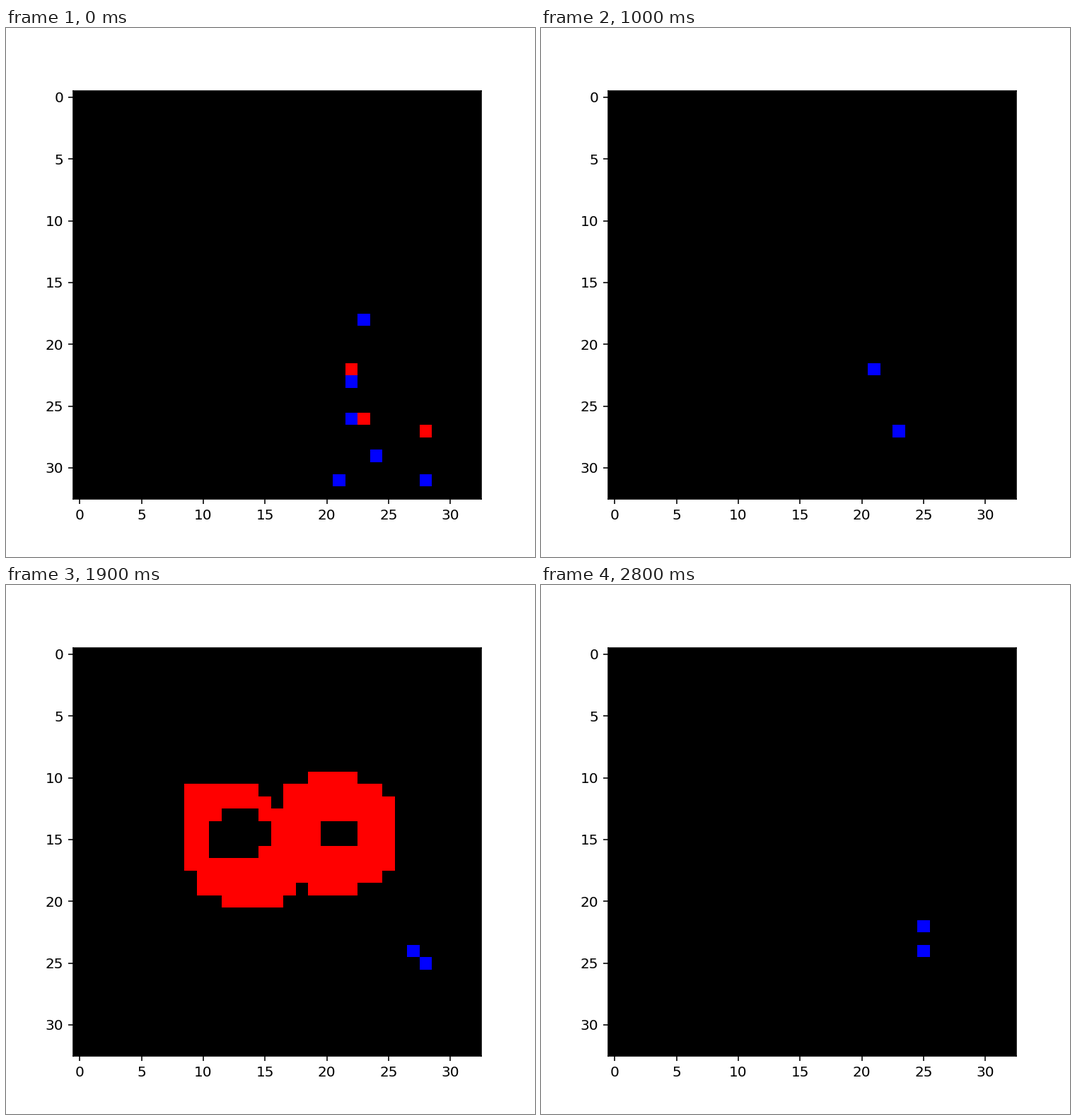
A matplotlib script that plays this animation: 748x748 px, repeating every 2.9 s.

```python
import numpy as np
import matplotlib.pyplot as plt
from matplotlib.animation import FuncAnimation

SIZE, DPI = 748, 144
GRID = 33
FRAMES, INTERVAL = 29, 100
RED, BLUE = 0, 2
LEFT, BOTTOM, SIDE = 95.47, 82.37, 576.58  # axes in pixels

ROW, COL = np.mgrid[:GRID, :GRID]


def oval(x, y, rx, ry, power=2, slant=0):
    """Field that is below 1 inside a slanted superellipse."""
    dx, dy = COL - x - slant * (ROW - y), ROW - y
    return np.abs(dx / rx) ** power + np.abs(dy / ry) ** power


def digit():
    """Mask of an eight lying on its side, with slightly rough edges."""
    rough = np.random.default_rng(8).normal(1, 0.06, (GRID, GRID))
    left = oval(12.7, 15.6, 4.1, 5, power=3, slant=0.25)
    right = oval(20.8, 14.5, 5, 4.8, power=2.3)
    holes = np.minimum(oval(12.8, 14.8, 2.6, 2.2), oval(21, 14.4, 1.6, 1.4))
    return (np.minimum(left, right) < rough) & (holes > 1)


DIGIT = digit()


def flash(i, start, peak, rate):
    """Share of the digit that fires: a sudden onset, then a decay."""
    return min(1, peak * np.exp(-rate * (i - start))) if i >= start else 0


def fire(share, rng):
    """Pick a share of the digit's pixels in small clumps."""
    noise = rng.random((GRID, GRID))
    clumps = noise + 0.3 * sum(np.roll(noise, step, axis)
                               for step in (-1, 1) for axis in (0, 1))
    return DIGIT & (clumps <= np.quantile(clumps[DIGIT], share))


def picture(i):
    rng = np.random.default_rng(i)
    image = np.zeros((GRID, GRID, 3))

    # Stray events, mostly low on the right, as the sensor settles
    for _ in range(round(2 + 8 * np.exp(-2 * i))):
        row, col = rng.normal((26, 24), (3.5, 4)).round().astype(int)
        channel = RED if rng.random() < 0.12 else BLUE
        image[min(row, 31), min(col, 30), channel] = 1

    on = flash(i, start=2, peak=1.15, rate=0.67)
    off = flash(i, start=18, peak=2.5, rate=0.84)
    for channel, share in ((BLUE, on), (RED, off)):
        if share > 0.01:
            image[fire(share, rng), channel] = 1
    return image


fig = plt.figure(figsize=(SIZE / DPI, SIZE / DPI), dpi=DPI)
ax = fig.add_axes([LEFT / SIZE, BOTTOM / SIZE, SIDE / SIZE, SIDE / SIZE])
screen = ax.imshow(picture(0), interpolation="nearest")


def draw(i):
    screen.set_data(picture(i))
    return [screen]


anim = FuncAnimation(fig, draw, frames=FRAMES, interval=INTERVAL,
                     repeat=True, repeat_delay=0)
plt.show()
```
